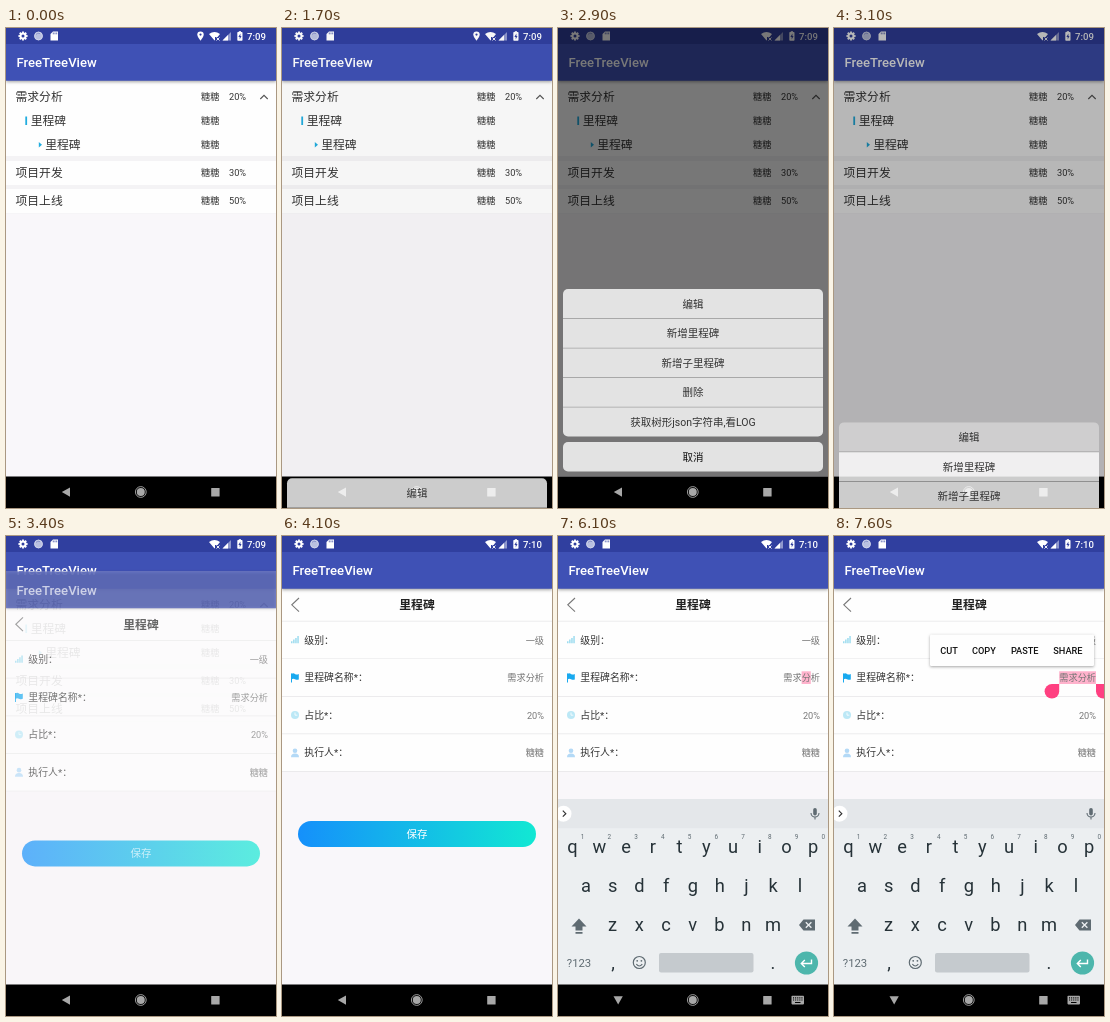
An HTML page with a canvas that plays this animation: 270 by 480 pixels, repeating every 8000 ms.

```html
<!DOCTYPE html>
<html lang="zh-CN">
<head>
<meta charset="utf-8">
<title>FreeTreeView</title>
<style>
html, body { margin: 0; width: 100%; height: 100%; overflow: hidden; background: #000; }
canvas { display: block; width: 100vw; height: 100vh; }
</style>
</head>
<body>
<canvas></canvas>
<script>
const W = 270, H = 480, NAV_TOP = 448.5, LOOP = 8000, STEP = 100;
const FONT = 'Roboto, "Noto Sans CJK SC", "Noto Sans CJK", sans-serif';
const PINK = '#ff4081';
const canvas = document.querySelector('canvas');
const g = canvas.getContext('2d');

const clamp = v => Math.max(0, Math.min(1, v));
const progress = (t, start, duration) => clamp((t - start) / duration);
const smooth = p => 0.5 - Math.cos(Math.PI * p) / 2;
const decelerate = p => 1 - (1 - p) ** 4;

// Drawing helpers
function rect(x, y, w, h, color, radius = 0) {
  g.fillStyle = color;
  g.beginPath();
  g.roundRect(x, y, w, h, radius);
  g.fill();
}
function disc(x, y, r, color) {
  g.fillStyle = color;
  g.beginPath();
  g.arc(x, y, r, 0, 7);
  g.fill();
}
function ring(x, y, r, color, width = 1) {
  g.strokeStyle = color;
  g.lineWidth = width;
  g.beginPath();
  g.arc(x, y, r, 0, 7);
  g.stroke();
}
function fillPath(d, color) {
  g.fillStyle = color;
  g.fill(new Path2D(d));
}
function strokePath(d, color, width = 1) {
  g.strokeStyle = color;
  g.lineWidth = width;
  g.stroke(new Path2D(d));
}
// y is the vertical centre of capitals and CJK glyphs
function text(s, x, y, size, color, align = 'left', weight = 400) {
  g.font = `${weight} ${size}px ${FONT}`;
  g.textAlign = align;
  g.fillStyle = color;
  g.fillText(s, x, y + size * 0.37);
}
function layer(alpha, dy, draw) {
  if (alpha <= 0) return;
  g.save();
  g.globalAlpha *= alpha;
  g.translate(0, dy);
  draw();
  g.restore();
}
function withShadow(color, blur, dy, draw) {
  const scale = canvas.width / W;
  g.save();
  g.shadowColor = color;
  g.shadowBlur = blur * scale;
  g.shadowOffsetY = dy * scale;
  draw();
  g.restore();
}

function statusBar(t) {
  rect(0, 0, W, 16, '#303f9f');
  for (let i = 0; i < 4; i++) {
    const a = i * Math.PI / 4, dx = Math.cos(a) * 4.6, dy = Math.sin(a) * 4.6;
    strokePath(`M${17 - dx} ${8 - dy}L${17 + dx} ${8 + dy}`, '#fff', 1.8);
  }
  disc(17, 8, 3.5, '#fff');
  disc(17, 8, 1.5, '#303f9f');
  disc(32.5, 8, 4.3, '#b9c0e0');
  ring(32.5, 8, 3.9, '#d5d9ec', 0.8);
  strokePath('M30 6.5A3 3 0 0 1 34 5.6', '#7f89c4', 0.8);
  fillPath('M44.5 6L47 3.5H52V12.5H44.5Z', '#fff');
  strokePath('M47.3 4.5V6.3M49 4.5V6.3M50.7 4.5V6.3', '#303f9f', 0.7);
  if (t < 2300) {
    fillPath('M194.5 12.8C192.4 10 191.3 8.3 191.3 6.6A3.2 3.2 0 0 1 197.7 6.6C197.7 8.3 196.6 10 194.5 12.8Z', '#fff');
    disc(194.5, 6.6, 1.1, '#303f9f');
  }
  fillPath('M203 6Q208.5 1.8 214 6L211.6 9H209V12L208.5 12.6Z', '#fff');
  strokePath('M210.5 9.5L213.5 12.5M213.5 9.5L210.5 12.5', '#fff', 0.9);
  fillPath('M216.5 12.5L225 4V12.5Z', '#8f98cd');
  fillPath('M216.5 12.5L222 7V12.5Z', '#fff');
  rect(231.3, 4, 5.2, 8.8, '#fff', 0.7);
  rect(232.8, 3.2, 2.2, 1, '#fff');
  fillPath('M234.4 5.5L232.4 8.9H233.7V11.5L235.5 8H234.4Z', '#303f9f');
  text(t < 3800 ? '7:09' : '7:10', 260, 8.2, 9.6, '#fff', 'right', 500);
}

function toolbar() {
  withShadow('rgba(0,0,0,.35)', 3, 1, () => rect(0, 16, W, 36.7, '#3f51b5'));
  text('FreeTreeView', 10.5, 34.5, 13.1, '#fff', 'left', 500);
}

function listScreen() {
  rect(0, 16, W, 433, '#f9f7fa');
  rect(0, 52, W, 133.5, '#f4f3f5');
  rect(0, 52, W, 76, '#fefefe');
  rect(0, 133, W, 24, '#fefefe');
  rect(0, 161, W, 24, '#fefefe');
  const rows = [
    ['需求分析', 9.5, 69, '20%'], ['里程碑', 24.7, 93, ''], ['里程碑', 39.2, 117, ''],
    ['项目开发', 9.5, 145, '30%'], ['项目上线', 9.5, 173, '50%'],
  ];
  for (const [name, x, y, share] of rows) {
    text(name, x, y, 11.8, '#333');
    text('糖糖', 195, y, 9.2, '#333');
    text(share, 223, y, 9.2, '#333');
  }
  rect(19.3, 88.5, 1.8, 8.5, '#22addf');
  fillPath('M32.8 114L36 116.7L32.8 119.4Z', '#22addf');
  strokePath('M254.3 71L258 67.3L261.7 71', '#555', 1.1);
  toolbar();
}

function actionSheet(pressed) {
  const top = 261, rowHeight = 29.5, left = 5, width = 260;
  const labels = ['编辑', '新增里程碑', '新增子里程碑', '删除', '获取树形json字符串,看LOG'];
  labels.forEach((label, i) => {
    const y = top + i * rowHeight;
    const corners = i === 0 ? [5, 5, 0, 0] : i === 4 ? [0, 0, 5, 5] : 0;
    rect(left, y, width, rowHeight, pressed && i === 0 ? 'rgba(214,214,214,.8)' : 'rgba(255,255,255,.8)', corners);
    if (i) rect(left, y - 0.3, width, 0.7, 'rgba(120,120,120,.6)');
    text(label, 135, y + 14.8, 10.5, '#333', 'center');
  });
  rect(left, 414, width, 29.5, 'rgba(255,255,255,.8)', 5);
  text('取消', 135, 428.7, 10.5, '#111', 'center', 500);
}

function detailIcons() {
  [2, 3.7, 5.4, 7.2].forEach((h, i) => rect(9 + i * 2.1, 107.3 - h, 1.5, h, '#9ddcef'));
  rect(9, 137.5, 1, 9, '#18a9ef');
  fillPath('M9.5 137.8Q11.5 136.8 13 138T16.8 138V143.4Q15 144.2 13 143.2T9.5 143.4Z', '#18a9ef');
  disc(13, 179, 4, '#bce8f6');
  strokePath('M13 176.5V179.2H15.3', '#fff', 0.8);
  disc(13, 214.7, 2.3, '#b3d9f6');
  fillPath('M9 221.2Q9 217.5 13 217.5T17 221.2Z', '#b3d9f6');
}

function selection(t) {
  const left = 225.2, all = t >= 7200;
  const from = all ? left : left + 18.4, to = all ? 262 : left + 27.6;
  if ((t >= 4800 && t < 5300)) rect(225, 135.5, 1.3, 12.5, PINK);
  if (t >= 5700 && t < 5900) rect(243.2, 135.5, 1.3, 12.5, PINK);
  if (t >= 5900) rect(from, 135.3, to - from, 12.7, 'rgba(255,64,129,.4)');
  return [from, to];
}

function detailScreen(t) {
  rect(0, 16, W, 433, '#f9f7fa');
  rect(0, 52, W, 183.5, '#fefefe');
  strokePath('M17 62L9.8 68.8L17 75.6', '#777', 1.1);
  text('里程碑', 135, 69, 11.8, '#222', 'center', 700);
  for (let i = 0; i < 5; i++) rect(0, 84.8 + i * 37.6, W, 0.7, '#e6e5e7');
  selection(t);
  const fields = [['级别：', '一级'], ['里程碑名称*：', '需求分析'], ['占比*：', '20%'], ['执行人*：', '糖糖']];
  fields.forEach(([label, value], i) => {
    const y = 104.2 + i * 37.5;
    text(label, 22.3, y, 9.9, '#333');
    text(value, 262, y, 9.2, '#777', 'right');
  });
  detailIcons();
  const blend = g.createLinearGradient(16, 0, 254, 0);
  blend.addColorStop(0, '#1590fb');
  blend.addColorStop(1, '#12e8d3');
  rect(16, 285, 238, 26, blend, 13);
  text('保存', 135, 298, 10.5, '#fff', 'center');
  toolbar();
}

function keyboard() {
  const ink = '#263238', grey = '#5f6b72';
  rect(0, 263, W, 186, '#eceff1');
  rect(0, 263, W, 29.3, '#e4e7ea');
  disc(5.5, 277.7, 8, '#fff');
  strokePath('M4.8 274.7L7.8 277.7L4.8 280.7', '#333', 1.2);
  rect(255.2, 272, 3.6, 7.5, grey, 1.8);
  strokePath('M253 277A4 4 0 0 0 261 277M257 281V283.5', grey, 1.1);

  const key = (s, x, baseline) => text(s, x, baseline - 18.3 * 0.37, 18.3, ink, 'center');
  [['qwertyuiop', 14.5, 317.3], ['asdfghjkl', 28, 356], ['zxcvbnm', 54.5, 395]].forEach(([letters, x, y]) =>
    [...letters].forEach((c, i) => key(c, x + i * 26.75, y)));
  [...'1234567890'].forEach((c, i) => text(c, 24.5 + i * 26.75, 301, 6.4, grey, 'center'));

  fillPath('M21 382.5L28.5 390.5H24.5V394.5H17.5V390.5H13.5Z', grey);
  rect(17.5, 396, 7, 1.7, grey);
  fillPath('M241 389L245.5 383.5H257V394.5H245.5Z', grey);
  strokePath('M247.8 386.2L253.4 391.8M253.4 386.2L247.8 391.8', '#eceff1', 1.3);

  text('?123', 21, 427, 11.3, grey, 'center');
  key(',', 55, 433);
  ring(81.3, 426.5, 6, grey, 1.2);
  disc(79.2, 424.8, 0.9, grey);
  disc(83.4, 424.8, 0.9, grey);
  strokePath('M78.3 428Q81.3 432 84.3 428', grey, 1.2);
  rect(101, 417, 94.5, 19.5, '#c5cace', 2);
  key('.', 215, 433);
  disc(248.5, 427, 11.6, '#4db6ac');
  strokePath('M253.5 423.5V427.5H243.5M246.8 424L243.3 427.5L246.8 431', '#fff', 1.4);
}

function navBar(typing) {
  const color = '#a8a8a8';
  rect(0, NAV_TOP, W, H - NAV_TOP, '#000');
  fillPath(typing ? 'M55.5 460.3H64.8L60.2 468.5Z' : 'M64 459.5V468.7L55.8 464.1Z', color);
  ring(134.8, 464, 5.4, color, 0.9);
  disc(134.8, 464, 4, color);
  rect(205.2, 460, 8.4, 8.4, color, 0.5);
  if (!typing) return;
  rect(233.5, 459.8, 12.5, 8.6, color, 0.8);
  for (let i = 0; i < 10; i++) rect(235 + i % 5 * 2.1, 461.3 + (i > 4) * 2.1, 1.1, 1.1, '#000');
  rect(237, 466, 5.5, 1, '#000');
}

function handle(x, side) {
  rect(side < 0 ? x - 14.6 : x, 148, 14.6, 14.6, PINK, side < 0 ? [7.3, 0, 7.3, 7.3] : [0, 7.3, 7.3, 7.3]);
}

function editMenu(left, withSelectAll) {
  withShadow('rgba(0,0,0,.35)', 3, 1, () => rect(left, 98.5, 260 - left, 31.5, '#fefefe', 1.2));
  const items = [['CUT', 10.3], ['COPY', 42], ['PASTE', 81], ['SHARE', 123.3]];
  if (withSelectAll) items.push(['SELECT ALL', 167]);
  for (const [label, x] of items) text(label, left + x, 114.3, 9.2, '#111', 'left', 500);
}

function editOverlays(t) {
  if (t >= 6800 && t < 7200 || t >= 7400) {
    const all = t >= 7400;
    handle(all ? 225.2 : 243.6, -1);
    handle(all ? 262 : 252.8, 1);
  }
  layer(progress(t, 6740, 150) - progress(t, 7060, 140), 0, () => editMenu(30, true));
  layer(progress(t, 7340, 200), 0, () => editMenu(96, false));
}

function draw(t) {
  const typing = t >= 5900;
  const opened = progress(t, 3350, 200);
  if (opened < 1) listScreen();
  layer(decelerate(opened), 36 * (1 - decelerate(progress(t, 3350, 350))), () => detailScreen(t));
  statusBar(t);

  if (typing) {
    g.save();
    g.beginPath();
    g.rect(0, 0, W, NAV_TOP);
    g.clip();
    layer(1, 186 * (1 - decelerate(progress(t, 5870, 200))), keyboard);
    g.restore();
    editOverlays(t);
  }
  navBar(typing);

  const dim = smooth(progress(t, 1652, 300)) - smooth(progress(t, 2985, 240));
  if (dim > 0) rect(0, 0, W, NAV_TOP, `rgba(0,0,0,${0.53 * dim})`);
  const raised = smooth(progress(t, 1652, 200)) - smooth(progress(t, 2986, 200));
  if (raised > 0) layer(1, 219 * (1 - raised), () => actionSheet(t > 2900));
}

function frame() {
  const ratio = devicePixelRatio || 1;
  const w = Math.round(innerWidth * ratio), h = Math.round(innerHeight * ratio);
  if (canvas.width !== w || canvas.height !== h) Object.assign(canvas, { width: w, height: h });
  g.setTransform(w / W, 0, 0, h / H, 0, 0);
  // The screen refreshes ten times a second
  draw(Math.floor(performance.now() % LOOP / STEP) * STEP);
  requestAnimationFrame(frame);
}
frame();
</script>
</body>
</html>
```
